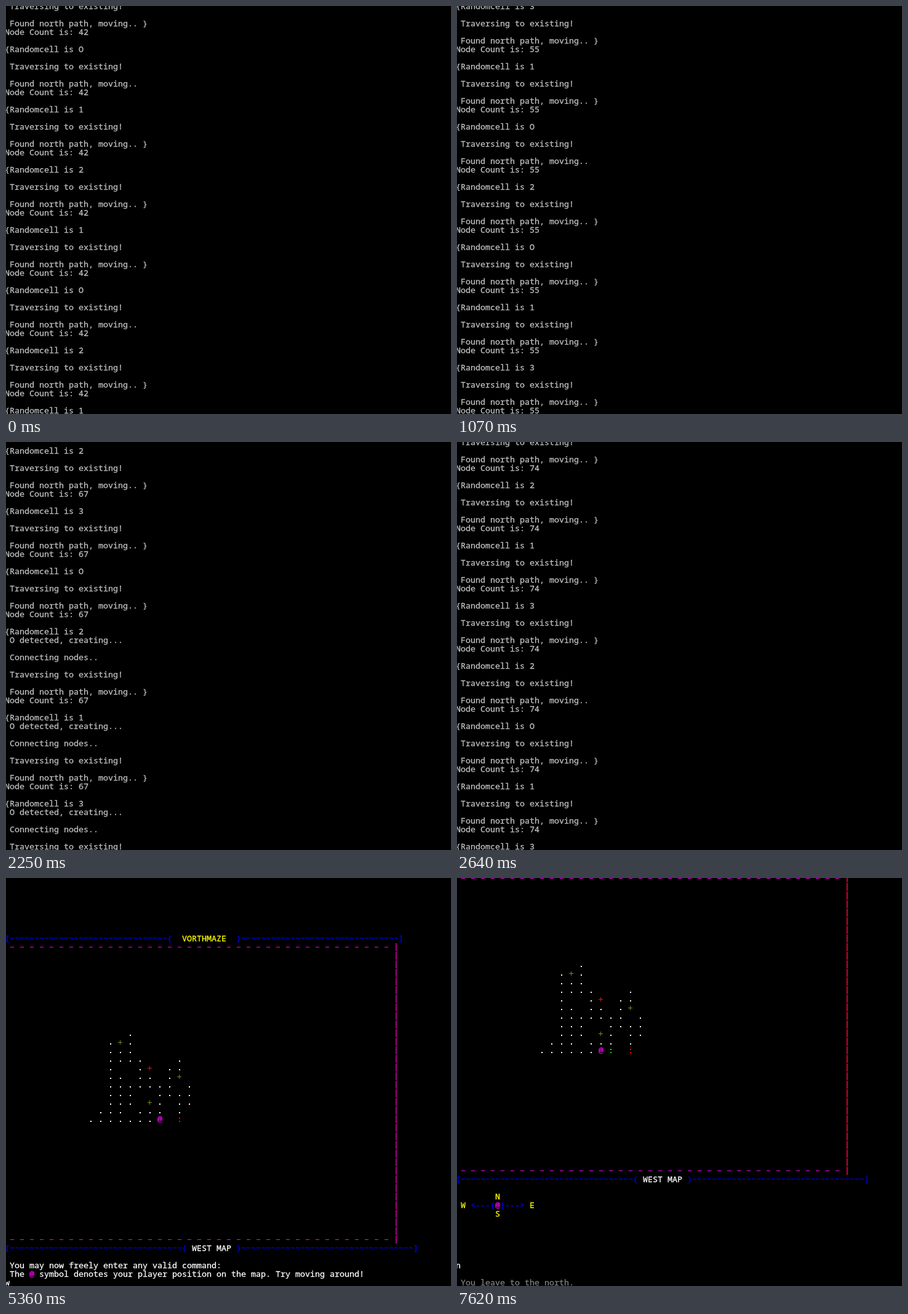
An HTML page with a canvas for the animation above (8000 ms loop, 723 px wide and 664 px high).

```html
<!DOCTYPE html>
<html>
<head>
<meta charset="utf-8">
<style>
  html, body { margin: 0; overflow: hidden; background: #000; }
  canvas { display: block; }
</style>
</head>
<body>
<canvas id="stage" width="723" height="664"></canvas>
<script>
const ctx = document.getElementById('stage').getContext('2d');
const LOOP = 8000, CELL_W = 8, ROW_H = 14, ROWS = 48;
const GREY = '#c0c0c0', WHITE = '#fff', BLUE = '#00f', YELLOW = '#ff0', PINK = '#f0f';

// Print text on the character grid; zeros are plain ovals in this terminal.
// A hairline outline gives the glyphs the terminal's crisp weight.
function put(row, col, text, color) {
  if (row < -1 || row > ROWS) return;
  ctx.fillStyle = ctx.strokeStyle = color;
  [...text].forEach((ch, i) => {
    if (ch === ' ') return;
    const glyph = [ch === '0' ? 'O' : ch, (col + i) * CELL_W - 2, row * ROW_H + 5];
    ctx.fillText(...glyph);
    ctx.strokeText(...glyph);
  });
}

// Pixel rectangle relative to the left edge and middle of a cell.
function block(row, col, x, y, w, h, color) {
  ctx.fillStyle = color;
  ctx.fillRect(col * CELL_W - 2 + x, row * ROW_H + y, w, h);
}

// Each cell is a digit plus an optional mark:
// "-" no closing brace, "n" creates a node, "c" connects nodes.
function drawLog(row, count, cells) {
  for (const [, digit, mark] of cells.matchAll(/(\d)([-nc]?)/g)) {
    const lines = ['{Randomcell is ' + digit];
    if (mark === 'n') {
      count++;
      lines.push(' 0 detected, creating...', '', 'before->north node++', ' Created node!');
    }
    if (mark === 'c') lines.push(' 0 detected, creating...', '', ' Connecting nodes..');
    lines.push('', ' Traversing to existing!', '',
      ' Found north path, moving..' + (mark === '-' ? '' : ' }'), 'Node Count is: ' + count, '');
    for (const line of lines) put(row++, 0, line, GREY);
  }
}

const ROOMS = [
  '    .',
  '  .+.',
  '  ...',
  '  ....   .',
  '  .  .r ..',
  '  .. .. .+',
  '  ....... .',
  '  ...  ....',
  '  ... +. ..',
  ' ... ... .'
];

function dot(row, col, color) {
  block(row, col, 3, 3, 2, 2, color);
}
function colon(row, col, color) {
  dot(row, col, color);
  block(row, col, 3, -2, 2, 2, color);
}
function plus(row, col, color) {
  block(row, col, 0, 1, 7, 1, color);
  block(row, col, 3, -2, 1, 7, color);
}
const SYMBOLS = {
  '.': (r, c) => dot(r, c, WHITE),
  '+': (r, c) => plus(r, c, '#808020'),
  r: (r, c) => plus(r, c, '#d01828'),
  ':': (r, c) => colon(r, c, '#f00000'),
  g: (r, c) => colon(r, c, '#00f000'),
  '@': (r, c) => put(r, c, '@', PINK)
};

function banner(row, wave, title, titleCol, openCol, endCol, color) {
  const tildes = '~'.repeat(wave);
  put(row, 0, '[' + tildes + '(', BLUE);
  put(row, titleCol, title, color);
  put(row, 47, ')' + tildes + ']', BLUE);
}

function drawMap(top, moved) {
  banner(top, 32, 'VORTHMAZE', 36, 33, 80, YELLOW);
  for (const row of [top + 1, top + 35]) {
    for (let col = 1; col < 79; col += 2) block(row, col, 1, 0, 6, 1, PINK);
  }
  for (let row = top + 1; row <= top + 35; row++) {
    block(row, 79, 3, -6, 1, 13, '#f00030');
    block(row, 79, 4, -6, 1, 13, '#7000a0');
  }

  [...ROOMS, moved ? '......@g :' : '.......@ :'].forEach((line, r) =>
    [...line].forEach((key, i) => SYMBOLS[key]?.(top + 11 + r, 17 + 2 * i)));
  banner(top + 36, 35, 'WEST MAP', 38, 36, 83, WHITE);

  if (moved) {
    put(top + 38, 8, 'N', YELLOW);
    put(top + 39, 1, 'W', YELLOW);
    put(top + 39, 3, '<---( )--->', BLUE);
    put(top + 39, 8, '@', PINK);
    put(top + 39, 15, 'E', YELLOW);
    put(top + 40, 8, 'S', YELLOW);
    put(top + 46, 0, 'n', WHITE);
    put(top + 48, 1, 'You leave to the north.', '#808080');
  } else {
    put(top + 38, 1, 'You may now freely enter any valid command:', WHITE);
    put(top + 39, 1, 'The   symbol denotes your player position on the map. Try moving around!', WHITE);
    put(top + 39, 5, '@', PINK);
    put(top + 40, 0, 'w', WHITE);
    put(top + 42, 1, 'You leave to the west.', '#808080');
  }
}

const log = (row, count, cells) => () => drawLog(row, count, cells);
const map = (top, moved) => () => drawMap(top, moved);

// Start time in ms and what the terminal shows from then on.
const STEPS = [
  [0, log(-2, 42, '1 0- 1 2 1 0- 2 1')],
  [130, log(-4, 44, '2 1 0 3- 1 2 0 3')],
  [280, log(-2, 47, '0 3 2 1 1- 0 2 0')],
  [410, log(-5, 50, '3 0 1 2 2 0- 1 3')],
  [550, log(-1, 53, '2 1 3 3- 0 1 0 2')],
  [670, log(-4, 53, '0 2 1 0- 3 1 2 0')],
  [790, log(-5, 54, '1 3 0 2 1 3- 0 1')],
  [940, log(-2, 55, '2 0 1 1 3 0 2- 1')],
  [1070, log(0, 55, '3 1 0- 2 0 1 3')],
  [1220, log(-1, 56, '0 2 3 1 2 0- 1')],
  [1380, log(-3, 57, '1 0 2 1- 3 0 2 3')],
  [1530, log(0, 57, '1 0 1 0 2 0n 3')],
  [1680, log(-5, 59, '2 3 0 1 2 1- 0 3')],
  [1800, log(-1, 61, '0 1 3 2 0 1 2')],
  [1950, log(1, 64, '1 3 0- 2 1 0 2')],
  [2110, log(1, 65, '0 2 1 3 0- 1 2')],
  [2250, log(1, 67, '2 3 0 2c 1c 3c')],
  [2370, log(-1, 69, '1 0 2c 3 1 0c')],
  [2490, log(-3, 71, '3 1 0 2- 1 3 0 2')],
  [2640, log(-2, 74, '0 2 1 3 2- 0 1 3')],
  [2760, log(-4, 77, '1 0n 3 2 0 1 2')],
  [2880, log(-5, 79, '2 1 3 0 1- 2 0 3')],
  [3000, () => { drawLog(1, 80, '1 3'); drawMap(40, false); }],
  [3150, map(8, false)],
  [5360, map(7, false)],
  [5480, map(5, false)],
  [6910, () => {}],
  [7060, map(15, true)],
  [7210, map(2, true)],
  [7620, map(-1, true)]
];

let shown;
function frame() {
  const t = performance.now() % LOOP;
  const step = STEPS.findLast(([start]) => start <= t);
  if (step !== shown) {
    shown = step;
    ctx.fillStyle = '#000';
    ctx.fillRect(0, 0, 723, 664);
    ctx.font = '13.333px "Noto Sans Mono", monospace';
    ctx.lineWidth = 0.3;
    step[1]();
  }
  requestAnimationFrame(frame);
}
frame();
</script>
</body>
</html>
```
